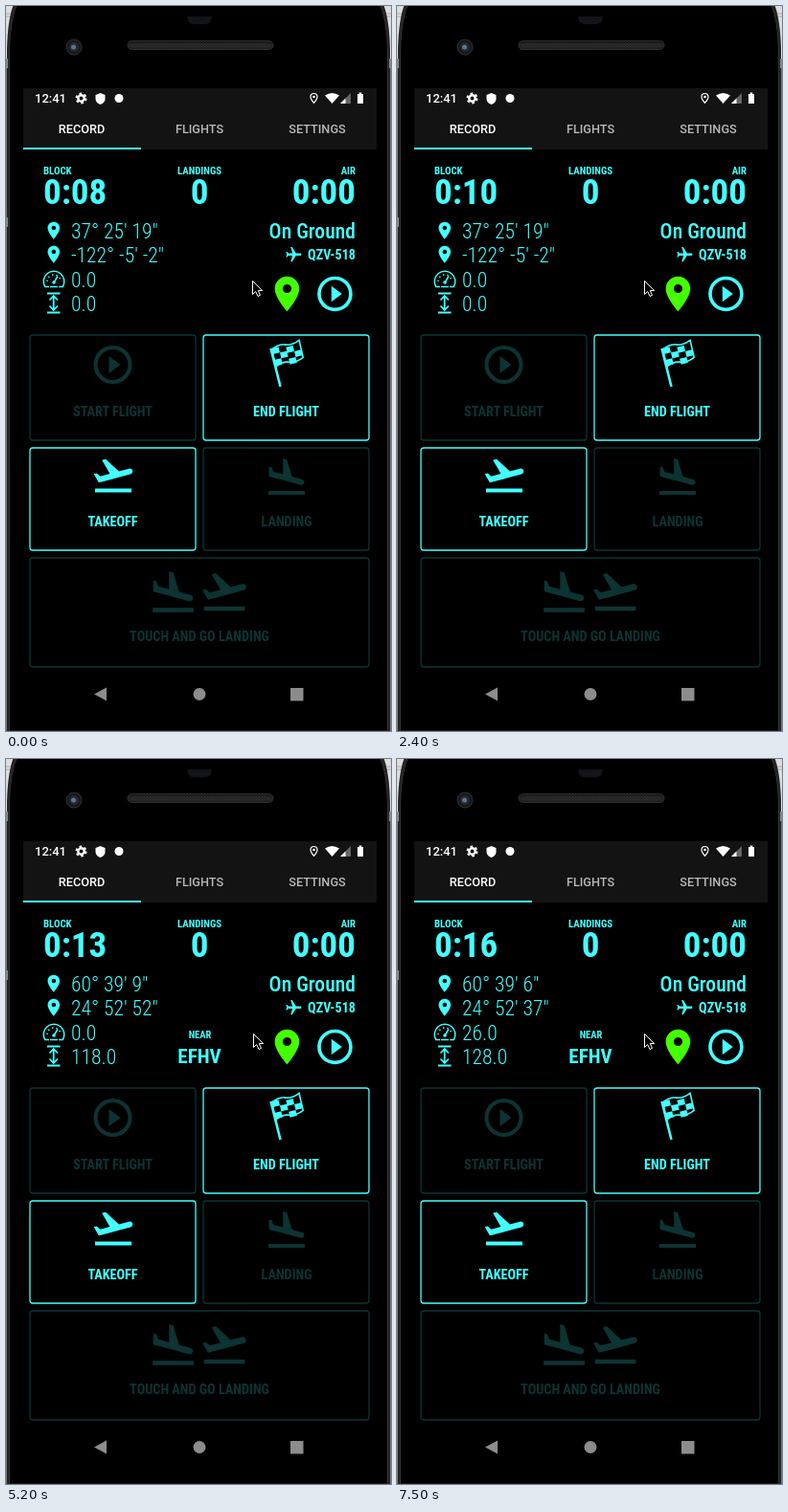
An HTML page for the animation above (8 s loop, 402 by 758 pixels).

```html
<!DOCTYPE html>
<html lang="en">
<head>
<meta charset="utf-8">
<title>Flight recorder</title>
<style>
  html, body { margin: 0; width: 100%; height: 100%; overflow: hidden; background: #000; }
  svg { display: block; width: 402px; height: 758px; }
  text { font-family: "Roboto Condensed", Roboto, sans-serif; font-stretch: 75%; font-weight: 700; white-space: pre; }
  .plain { font-family: Roboto, sans-serif; font-stretch: 100%; font-weight: 500; fill: #fff; }
  .cyan { fill: #4ff; }
  .line { fill: none; stroke: #4ff; }
  rect.line { stroke-width: 1.3px; }
  .light { font-weight: 300; font-size: 21.6px; }
  .big { font-size: 37px; }
  .tiny { font-size: 10.8px; }
  .label { font-size: 14.2px; }
  .mid { text-anchor: middle; }
  .end { text-anchor: end; }
  .off { opacity: .2; }
</style>
</head>
<body>
<svg viewBox="0 0 402 758">
  <defs>
    <linearGradient id="speaker" x2="0" y2="1">
      <stop stop-color="#111"/><stop offset=".5" stop-color="#262626"/><stop offset="1" stop-color="#1c1c1c"/>
    </linearGradient>
    <pattern id="mesh" width="3" height="3" patternUnits="userSpaceOnUse"><path d="M0 0h1v1h-1zM1.5 1.5h1v1h-1z" fill="#363636"/></pattern>
    <path id="pin" d="M12 2C8.13 2 5 5.13 5 9c0 5.25 7 13 7 13s7-7.75 7-13c0-3.87-3.13-7-7-7zm0 9.5a2.5 2.5 0 1 1 0-5 2.5 2.5 0 0 1 0 5z"/>
    <path id="play" d="M10 16.5l6-4.5-6-4.5zM12 2a10 10 0 1 0 0 20 10 10 0 0 0 0-20zm0 18a8 8 0 1 1 0-16 8 8 0 0 1 0 16z"/>
    <path id="takeoff" d="M2.5 19h19v2h-19zm19.57-9.36c-.21-.8-1.04-1.28-1.84-1.06L14.92 10l-6.9-6.43-1.93.51 4.14 7.17-4.97 1.33-1.97-1.54-1.45.39 2.59 4.49 1.6-.43 5.31-1.42 4.35-1.16L21 11.49c.81-.23 1.28-1.05 1.07-1.85z"/>
    <path id="landing" d="M2.5 19h19v2h-19zm7.18-5.73l4.35 1.16 5.31 1.42c.8.21 1.62-.26 1.84-1.06.21-.8-.26-1.62-1.06-1.84l-5.31-1.42-2.76-9.02L10.12 2v8.28L5.15 8.95l-.93-2.32-1.45-.39v5.17l1.6.43z"/>
    <path id="plane" d="M21 16v-2l-8-5V3.5a1.5 1.5 0 0 0-3 0V9l-8 5v2l8-2.5V19l-2 1.5V22l3.5-1 3.5 1v-1.5L13 19v-5.5z"/>
  </defs>

  <!-- phone body -->
  <path d="M0 0h402v55h-402z" fill="#ddd"/>
  <path d="M0 8h402M0 11h402" stroke="#aaa"/>
  <path d="M0 55h402v703h-402z" fill="#777"/>
  <path d="M1 758V45Q2 8 10-6H392Q400 8 401 45V758z" fill="#222"/>
  <path d="M3.500 758V48Q4 12 13-5H389Q398 12 398.500 48V758z" fill="#000" stroke="#333"/>
  <path d="M1 55v10M1 221v10M401 55v10" stroke="#888" stroke-width="2"/>
  <path d="M189 11h26q-1 8-7 8h-12q-6 0-7-8z" fill="#14151a"/>
  <g stroke="#303030">
    <rect x="127" y="36.500" width="152" height="9" rx="4.500" fill="url(#speaker)"/>
    <rect x="130" y="38" width="146" height="6" rx="3" fill="url(#mesh)" stroke="none"/>
    <circle cx="71" cy="43" r="8" fill="#17181b"/>
  </g>
  <circle cx="71" cy="43" r="5" fill="#25282e"/>
  <circle cx="70.500" cy="43" r="2.500" fill="#5a7590"/>

  <!-- status bar and tabs -->
  <path d="M18 86h369v64h-369z" fill="#131313"/>
  <path d="M18 148h123v2h-123z" class="cyan"/>
  <text class="plain" x="30" y="101" font-size="13">12:41</text>
  <g class="mid" font-size="12.700">
    <text class="plain" x="79" y="133">RECORD</text>
    <text class="plain" x="202" y="133" opacity=".7">FLIGHTS</text>
    <text class="plain" x="325" y="133" opacity=".7">SETTINGS</text>
  </g>
  <g fill="#fff">
    <circle cx="78.500" cy="96.500" r="3.200" fill="none" stroke="#fff" stroke-width="2.400"/>
    <circle cx="78.500" cy="96.500" r="5" fill="none" stroke="#fff" stroke-width="2" stroke-dasharray="2.618"/>
    <path d="M98.500 91l5 2v4q0 4-5 6q-5-2-5-6v-4z"/>
    <circle cx="118" cy="96.500" r="4.500"/>
    <path d="M321.500 91.500a3.500 3.500 0 0 1 3.500 3.500q0 2.300-3.500 6.300q-3.500-4-3.500-6.300a3.500 3.500 0 0 1 3.500-3.500z" fill="none" stroke="#fff" stroke-width="1.200"/>
    <circle cx="321.500" cy="95" r="1.300"/>
    <path d="M333 93.500q7.500-5 15 0l-7.500 8.500z"/>
    <path d="M349 102l11-11v11z" fill="#666"/><path d="M349 102l5.500-5.500v5.500z"/>
    <path d="M367 92h1.700v-1.500h2.600v1.500h1.700v10h-6z"/>
  </g>

  <!-- readings -->
  <g class="cyan">
    <text class="tiny" x="39" y="176">BLOCK</text>
    <text class="tiny mid" x="202" y="176">LANDINGS</text>
    <text class="tiny end" x="365" y="176">AIR</text>
    <text class="big" x="39" y="207" id="block"></text>
    <text class="big mid" x="202" y="207">0</text>
    <text class="big end" x="365" y="207">0:00</text>
    <use href="#pin" transform="translate(39 224) scale(.9)"/>
    <use href="#pin" transform="translate(39 249) scale(.9)"/>
    <text class="light reading" x="68" y="243"></text>
    <text class="light reading" x="68" y="268"></text>
    <text class="light reading" x="68" y="294"></text>
    <text class="light reading" x="68" y="319"></text>
    <text class="end" x="365" y="243" font-size="21.600" style="font-weight:500">On Ground</text>
    <text class="end label" x="365" y="265">QZV-518</text>
    <use href="#plane" transform="translate(310 250.500) rotate(90) scale(.8)"/>
    <g id="near" class="mid">
      <text x="202.500" y="292" font-size="10.500">NEAR</text>
      <text x="202" y="318" font-size="21">EFHV</text>
    </g>
    <use href="#pin" transform="translate(271.500 279) scale(1.830)" fill="#4f0"/>
    <use href="#play" transform="translate(321.500 279) scale(1.830)"/>
  </g>
  <g class="line" stroke-width="1.500">
    <path d="M45 293.500h-4.300a10.800 10.800 0 1 1 18.600 0h-4.300M46 293.500h8M50 289l4-6.500"/>
    <path d="M43 288a7 7 0 0 1 14 0" stroke-dasharray="1.500 2.900"/>
    <path d="M43 300.500h13.500M43 320.500h13.500M49.700 303v15M45.500 307.500l4.200-4.500 4.200 4.500M45.500 313.500l4.200 4.500 4.200-4.500" stroke-width="1.800"/>
  </g>
  <circle cx="50" cy="289" r="1.800" class="cyan"/>

  <!-- buttons -->
  <g class="off">
    <rect class="line" x="25" y="344" width="173" height="110" rx="3"/>
    <use href="#play" class="cyan" transform="translate(87.500 351) scale(2)"/>
    <text class="cyan label mid" x="111.500" y="429">START FLIGHT</text>
  </g>
  <rect class="line" x="206" y="344" width="173" height="110" rx="3"/>
  <path class="line" d="M276.500 358l10 40" stroke-width="2.600"/>
  <g transform="translate(277.500 359) rotate(-13)">
    <path class="line" d="M0 0q8-4 15-1.500t15-1.500v18.500q-8 4-15 1.500t-15 1.500z" stroke-width="1.600"/>
    <path id="checks" class="cyan"/>
  </g>
  <text class="cyan label mid" x="292.500" y="429">END FLIGHT</text>

  <rect class="line" x="25" y="462" width="173" height="107" rx="3"/>
  <use href="#takeoff" class="cyan" transform="translate(88 466.500) scale(2)"/>
  <text class="cyan label mid" x="111.500" y="544">TAKEOFF</text>
  <g class="off">
    <rect class="line" x="206" y="462" width="173" height="107" rx="3"/>
    <use href="#landing" class="cyan" transform="translate(269 469) scale(2)"/>
    <text class="cyan label mid" x="293" y="544">LANDING</text>
  </g>
  <g class="off">
    <rect class="line" x="25" y="577" width="354" height="114" rx="3"/>
    <use href="#landing" class="cyan" transform="translate(147.500 586.500) scale(2.250)"/>
    <use href="#takeoff" class="cyan" transform="translate(201 585) scale(2.250)"/>
    <text class="cyan label mid" x="202" y="664">TOUCH AND GO LANDING</text>
  </g>

  <!-- navigation bar -->
  <g fill="#8c8c8c">
    <path d="M92 719.500l13-7v14z"/>
    <circle cx="202" cy="719.500" r="6.500"/>
    <path d="M297 713h13.500v13.500h-13.500z"/>
  </g>
  <path id="cursor" d="M0 0v14l3.200-3 2.300 5 2.500-1.100-2.200-4.900h4.400z" fill="#000" stroke="#fff"/>
</svg>
<script>
  const LOOP = 8000;
  const fixes = [
    [0, `37° 25' 19"`, `-122° -5' -2"`, "0.0", "0.0"],
    [3600, `60° 39' 10"`, `24° 52' 52"`, "0.0", "125.0"],
    [4600, `60° 39' 9"`, `24° 52' 52"`, "0.0", "118.0"],
    [5600, `60° 39' 10"`, `24° 52' 51"`, "6.0", "124.0"],
    [6500, `60° 39' 10"`, `24° 52' 45"`, "20.0", "126.0"],
    [7500, `60° 39' 6"`, `24° 52' 37"`, "26.0", "128.0"],
  ];
  const byId = id => document.getElementById(id);
  const readings = document.querySelectorAll(".reading");

  // Checkered cells that follow the wave of the flag
  let checks = "";
  for (let row = 0; row < 3; row++)
    for (let col = 0; col < 4; col++)
      if ((row + col) % 2 === 0) {
        const lift = -1.5 * Math.sin((col + .5) * Math.PI / 2);
        checks += `M${col * 7.5} ${row * 6.2 + lift}h7.5v6.2h-7.5z`;
      }
  byId("checks").setAttribute("d", checks);

  function draw(now) {
    const t = now % LOOP;
    const seconds = 8 + Math.floor((t + 500) / 1000);
    byId("block").textContent = "0:" + String(seconds).padStart(2, "0");
    const [since, ...values] = fixes.findLast(fix => fix[0] <= t);
    values.forEach((value, i) => readings[i].textContent = value);
    byId("near").style.display = since ? "" : "none";
    byId("cursor").setAttribute("transform", `translate(${t < 100 ? 257.5 : 258.5} 287.5)`);
    requestAnimationFrame(draw);
  }
  requestAnimationFrame(draw);
</script>
</body>
</html>
```
